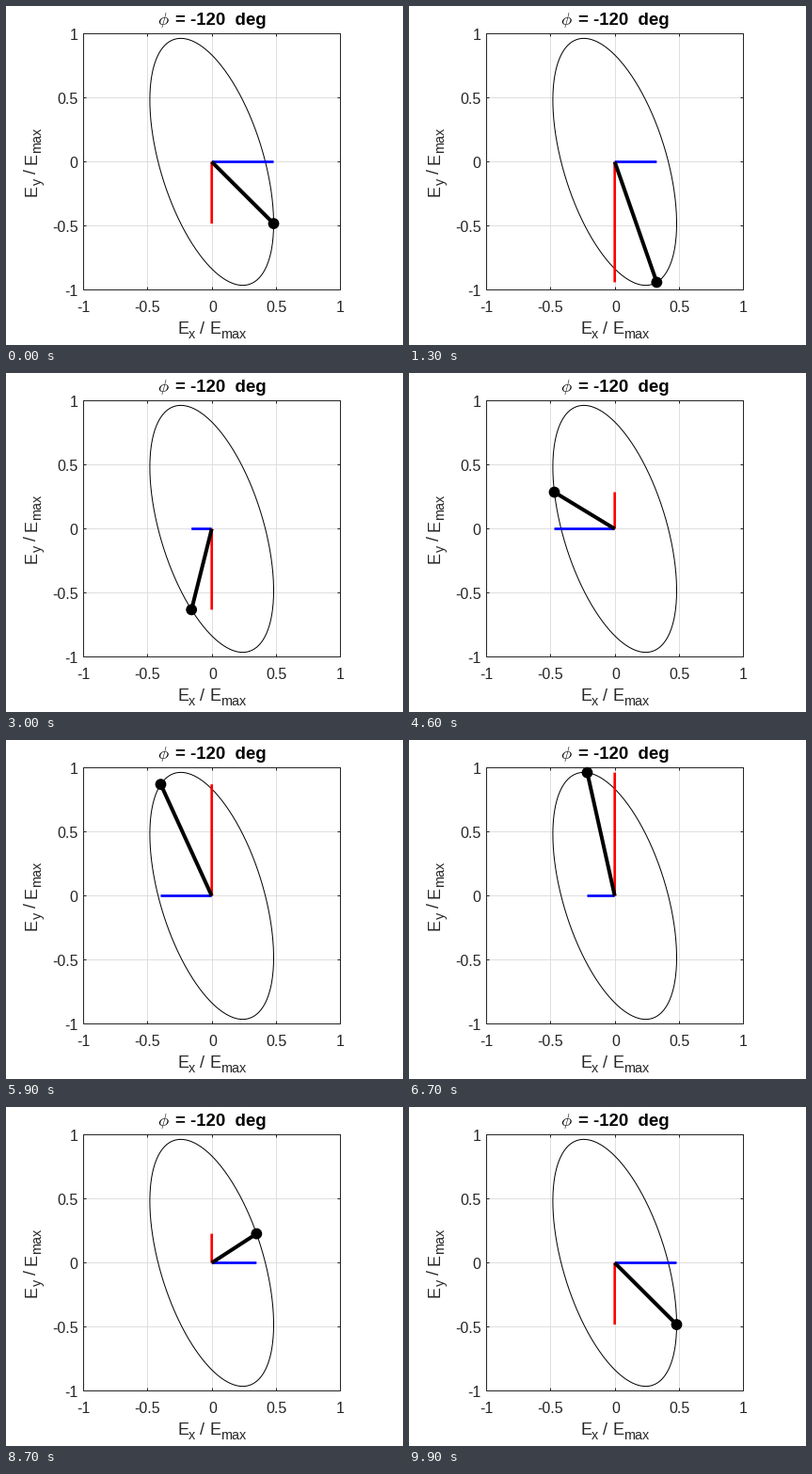
Animation, 422 px wide and 360 px high, one loop 10000 ms. Source, as a matplotlib script:

```python
import numpy as np
import matplotlib.pyplot as plt
from matplotlib.animation import FuncAnimation
from matplotlib.patches import Circle

W, H, DPI = 422, 360, 100
FRAMES = 100
PX = 72 / DPI                                  # one pixel in points

LEFT, RIGHT, TOP, BOTTOM = 82.5, 355.5, 29.5, 301.5
CX, CY = 218.7, 165.5
SX, SY = 136.5, 136.0
GRAY = "#262626"

# Two field components, scaled so the ellipse's major semi-axis is 1
PHI = np.radians(-120)
A1, A2 = 1.0, 2.0
E_MAX = np.sqrt((A1**2 + A2**2 + np.hypot(A2**2 - A1**2,
                                          2 * A1 * A2 * np.cos(PHI))) / 2)

plt.rcParams.update({
    "font.family": "Liberation Sans",
    "mathtext.fontset": "cm",
    "path.snap": False,
    "lines.solid_capstyle": "butt",
})

fig = plt.figure(figsize=(W / DPI, H / DPI), dpi=DPI, facecolor="white")
ax = fig.add_axes([0, 0, 1, 1])
ax.set_xlim(0, W)
ax.set_ylim(H, 0)
ax.axis("off")


def field(angle):
    ex = A1 / E_MAX * np.cos(angle)
    ey = A2 / E_MAX * np.cos(angle - PHI)
    return CX + SX * ex, CY - SY * ey


def line(x, y, color, width, z):
    return ax.plot(x, y, color=color, lw=width * PX, zorder=z)[0]


def label(x, y, text, size, color=GRAY, **kw):
    ax.text(x, y, text, fontsize=size * PX, color=color,
            va="baseline", **kw)


def axis_title(x, y, sub, vertical=False):
    """Write E_sub / E_max starting at (x, y), along x or upwards."""
    big, small = 18, 14.4
    runs = [("E", 0, 0, big), (sub, 12, 5, small),
            ("/", 24.2, 0, big), ("E", 34.2, 0, big),
            ("max", 46.2, 5, small)]
    for text, along, drop, size in runs:
        if vertical:
            label(x + drop, y - along, text, size, rotation=90,
                  rotation_mode="anchor", ha="left")
        else:
            label(x + along, y + drop, text, size, ha="left")


# Grid, ticks and tick labels
TICK = 3
for i, name in enumerate(["-1", "-0.5", "0", "0.5", "1"]):
    gx = np.floor(LEFT + i * SX / 2) + 0.5
    gy = np.floor(BOTTOM - i * SY / 2) + 0.5
    if 0 < i < 4:
        line([gx, gx], [TOP, BOTTOM], "#dfdfdf", 1, 1)
        line([LEFT, RIGHT], [gy, gy], "#dfdfdf", 1, 1)
        for edge, step in ((TOP, TICK), (BOTTOM, -TICK)):
            line([gx, gx], [edge, edge + step], GRAY, 1, 2)
        for edge, step in ((LEFT, TICK), (RIGHT, -TICK)):
            line([edge, edge + step], [gy, gy], GRAY, 1, 2)
    label(gx, 325, name, 16, ha="center")
    label(76.5, gy + 6.5, name, 16, ha="right")

line([LEFT, RIGHT, RIGHT, LEFT, LEFT, RIGHT],
     [TOP, TOP, BOTTOM, BOTTOM, TOP, TOP], GRAY, 1, 2)

axis_title(182, 348, "x")
axis_title(32.5, 202, "y", vertical=True)
label(161, 20, r"$\phi$", 18.67, "black", ha="left")
label(276.5, 20, "= -120  deg", 18.67, "black", ha="right", weight="bold")

# Ellipse and moving parts
line(*field(np.linspace(0, 2 * np.pi, 400)), "black", 1, 3)
x_part = line([], [], "blue", 2.67, 4)
y_part = line([], [], "red", 2.67, 5)
vector = line([], [], "black", 4, 6)
tip = ax.add_patch(Circle((CX, CY), 5.9, fc="black", ec="none", zorder=7))


def update(frame):
    x, y = field(2 * np.pi * frame / (FRAMES - 1))
    x_part.set_data([CX, x], [CY, CY])
    y_part.set_data([CX, CX], [CY, y])
    vector.set_data([CX, x], [CY, y])
    tip.center = x, y
    return x_part, y_part, vector, tip


anim = FuncAnimation(fig, update, frames=FRAMES, interval=100,
                     repeat=True, repeat_delay=0)
plt.show()
```
